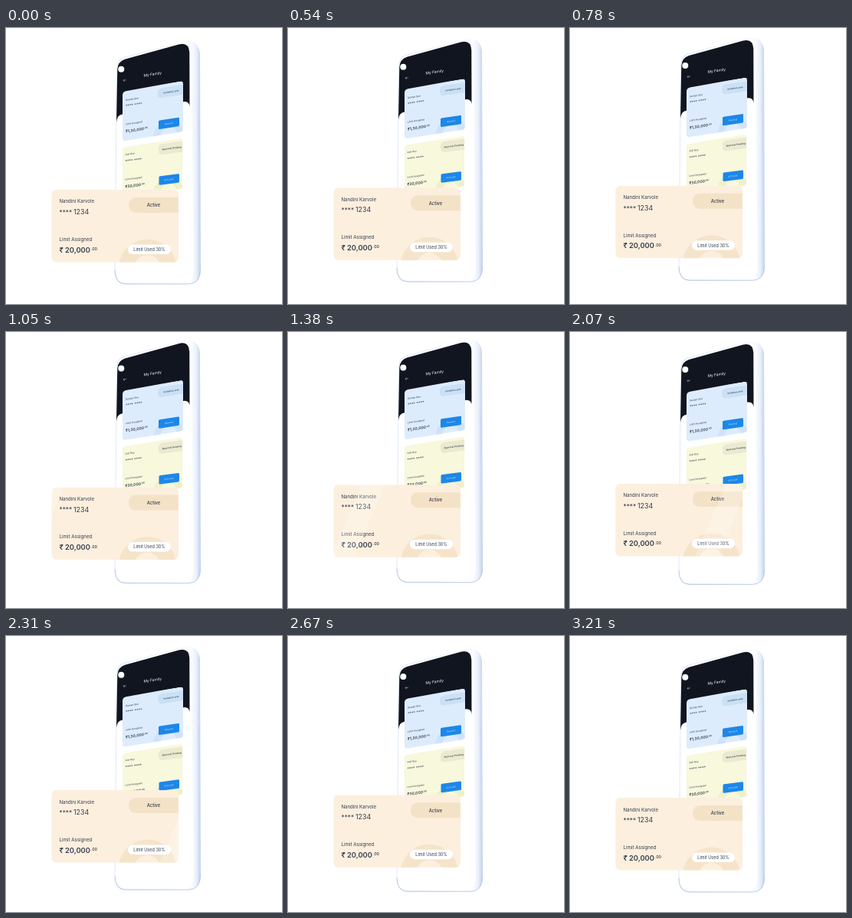
An HTML page for the animation above (3.24 s loop, 360x360 px).

```html
<!DOCTYPE html>
<html lang="en">
<head>
<meta charset="utf-8">
<style>
html, body { margin: 0; width: 100%; height: 100%; overflow: hidden; background: #fff; }
svg { display: block; width: 100vw; height: 100vh; }
text { font-family: Inter, "Noto Sans", sans-serif; fill: #343b4e; }
.small { font-size: 3.2px; }
.tag { font-size: 3px; font-weight: 500; }
.sum { font-size: 5px; font-weight: 600; }
.button { fill: #1d87e8; }
.button + text { fill: #b5d9fb; font-size: 3.2px; text-anchor: middle; }
</style>
</head>
<body>
<svg viewBox="0 0 360 360">
  <defs>
    <linearGradient id="side" x1="0" x2="1">
      <stop offset="0" stop-color="#e0e9f7"/>
      <stop offset=".89" stop-color="#fbfcff"/>
      <stop offset=".95" stop-color="#e9f0fb"/>
      <stop offset="1" stop-color="#bfd0e9"/>
    </linearGradient>
    <clipPath id="cardClip"><rect x="59.5" y="211" width="165.5" height="94.5" rx="6"/></clipPath>
    <clipPath id="miniClip">
      <path d="M0 7Q0 2.500 4.500 2.200L75 0Q79 0 79 4V62Q79 66 75 66.300L4.500 67Q0 67 0 62.500Z"/>
    </clipPath>
  </defs>

  <g id="phone">
    <path fill="url(#side)" d="M141.5 318L144 52Q145 41 154 38L230 18Q250 13 253 33L254 315Q254 334.500 238 334.500H156Q142 334.500 141.500 318Z"/>
    <path fill="#fff" d="M142.5 318L145 53Q146 42 155 39L226 20Q240 17 241 33L245 314Q245 333 231 333H157Q143 333 142.500 318Z"/>
    <path fill="none" stroke="#b7c9e3" stroke-width=".9" d="M142 316Q142.500 334 156 334.200H238Q253 334 253.600 315"/>
    <path fill="none" stroke="#ccdaee" stroke-width="1" d="M250.800 107v6M251 117l.4 48"/>
    <path fill="#11151f" d="M144 123L145.3 54Q146 44 155 41L226 21.500Q238.500 18.500 239.300 32L239.500 103Q239 95 231 96.500L151 113Q145 114 144 123Z"/>
    <circle cx="150.300" cy="54" r="4" fill="#fff"/>
    <path fill="none" stroke="#fff" stroke-width=".4" d="M157 68l-4 .7m1.500 -1.700l-1.500 1.700l1.800 1.300"/>
    <text transform="matrix(1 -.15 0 1 179.500 64)" font-size="4.900" style="fill:#fff">My Family</text>

    <g transform="matrix(1 -.15 0 1 152 81)">
      <g clip-path="url(#miniClip)">
        <rect width="79" height="68" fill="#ddecfc"/>
        <circle cx="60" cy="68" r="15" fill="none" stroke="#cfe3f8" stroke-width="9"/>
        <rect x="46" y="5" width="40" height="13" rx="5" fill="#c9e0f5"/>
      </g>
      <text class="small" x="4" y="15">Suman Sen</text>
      <text class="tag" x="53.500" y="13">Invitation sent</text>
      <text x="4" y="23.500" font-size="5">**** ****</text>
      <text class="small" x="4" y="46.500">Limit Assigned</text>
      <text class="sum" x="4" y="56.500">₹1,30,000<tspan dy="-1.500" font-size="3">.00</tspan></text>
      <rect class="button" x="47" y="47" width="27" height="11.500" rx="1.500"/>
      <text x="60.500" y="54">Resend</text>
    </g>

    <g transform="matrix(1 -.13 0 1 151.500 154)">
      <g clip-path="url(#miniClip)">
        <rect width="79" height="68" fill="#f7f8dc"/>
        <circle cx="60" cy="68" r="15" fill="none" stroke="#eff0c9" stroke-width="9"/>
        <rect x="47.500" y="4" width="40" height="14" rx="5" fill="#ebe9cf"/>
      </g>
      <text class="small" x="4" y="13">Anil Roy</text>
      <text class="tag" x="52" y="12.500">Approval Pending</text>
      <text x="4" y="22.500" font-size="5">**** ****</text>
      <text class="small" x="4" y="45.500">Limit Assigned</text>
      <text class="sum" x="4" y="55.500">₹30,000<tspan dy="-1.500" font-size="3">.00</tspan></text>
      <rect class="button" x="48" y="46" width="26.500" height="11.500" rx="1.500"/>
      <text x="61" y="53">Activate</text>
    </g>
  </g>

  <g id="card">
    <g clip-path="url(#cardClip)">
      <rect x="59" y="211" width="167" height="95" fill="#fcefde"/>
      <circle cx="184.500" cy="313" r="27.300" fill="none" stroke="#f5e4ca" stroke-width="20.500"/>
      <rect x="160" y="221" width="80" height="20" rx="9" fill="#f4e2c7"/>
    </g>
    <rect x="159" y="282.500" width="56" height="12.500" rx="6.200" fill="#fff"/>
    <text x="69.500" y="228.500" font-size="6.100">Nandini Karvole</text>
    <text x="69.500" y="243.800" font-size="8.300">****</text>
    <text x="88" y="243" font-size="8.800">1234</text>
    <text x="69.500" y="277.800" font-size="6.200">Limit Assigned</text>
    <text x="69.500" y="292.500" font-size="9.300" font-weight="600">₹ 20,000<tspan dx=".8" dy="-2.500" font-size="5.400" font-weight="500">.00</tspan></text>
    <text x="192.500" y="233.300" font-size="5.800" font-weight="500" text-anchor="middle">Active</text>
    <text x="187" y="290.900" font-size="5.500" text-anchor="middle">Limit Used 30%</text>
    <g clip-path="url(#cardClip)">
      <path id="shine" fill="#fff" opacity=".22" d="M5 211h30l-40 95h-30Z"/>
    </g>
  </g>
</svg>
<script>
const LOOP = 3240;
const [phone, card, shine] = ["phone", "card", "shine"].map(id => document.getElementById(id));
const ease = p => (1 - Math.cos(Math.PI * Math.min(1, Math.max(0, p)))) / 2;
const move = (el, x, y) => el.setAttribute("transform", `translate(${x} ${y})`);

function draw(now) {
  const t = now % LOOP;
  move(phone, 0, -3.75 * (1 + Math.cos(2 * Math.PI * (t - 1420) / LOOP)));
  // The card rises slowly and sinks faster than the phone.
  move(card, 0, -14 * (ease(t / 1860) - ease((t - 1860) / 1240)));
  move(shine, 20 + (t - 1050) * .155 + 20, 0);
  requestAnimationFrame(draw);
}
draw(performance.now());
</script>
</body>
</html>
```
